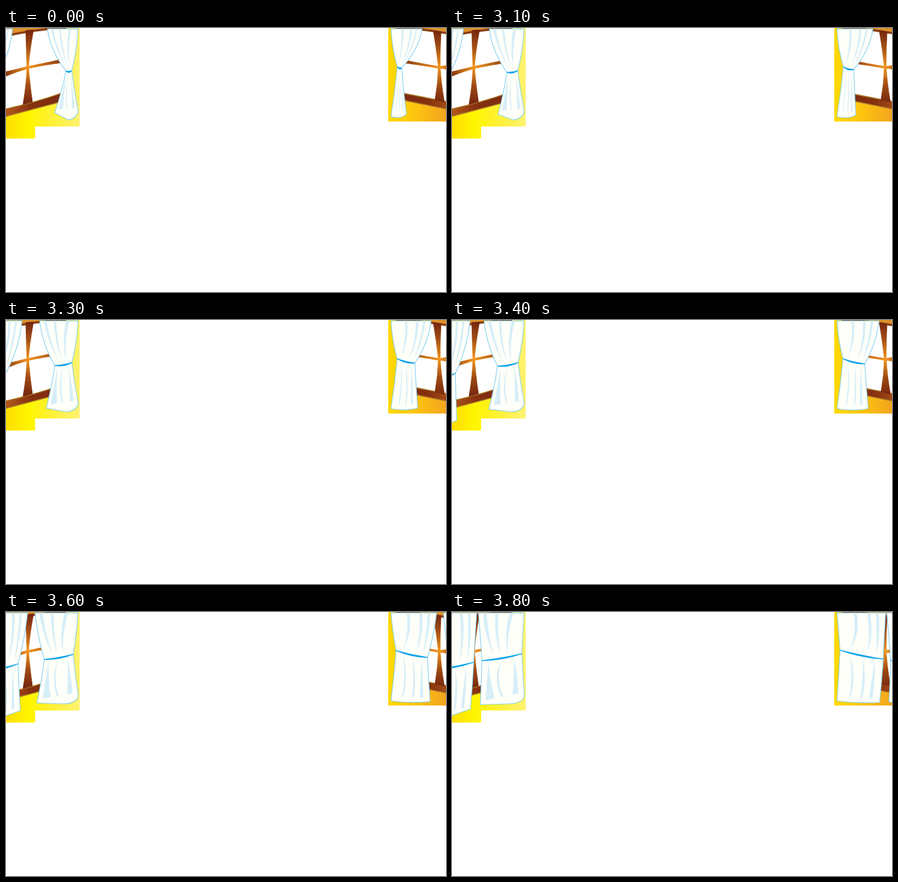
Write an HTML page that moves like this. It is 800 px wide and 480 px high and loops after 4 s.

```html
<!DOCTYPE html>
<html lang="en">
<head>
<meta charset="utf-8">
<title>Curtains closing</title>
<style>
  html, body { margin: 0; width: 100%; height: 100%; overflow: hidden; background: #fff; }
  svg { display: block; width: 800px; height: 480px; }
  .pane { fill: #fff; }
  .rail { stroke: #a9782a; stroke-width: 1.8; }
  .lintel { fill: #dc922c; stroke: #8a4013; stroke-width: 4; }
  .post { fill: url(#post); stroke: url(#post); }
  .cloth { fill: #fffffa; stroke: #80cfef; stroke-width: 1.2; stroke-linejoin: round; }
  .fold { fill: #d6eef8; }
  .tie { fill: #0aa3ec; stroke: #0aa3ec; stroke-width: 1.3; stroke-linejoin: round; }
</style>
</head>
<body>
<svg viewBox="0 0 800 480">
  <defs>
    <linearGradient id="wallL" gradientUnits="userSpaceOnUse" x1="0" x2="134" y1="0" y2="0">
      <stop offset="0" stop-color="#ffdc00"/>
      <stop offset=".32" stop-color="#fff600"/>
      <stop offset=".5" stop-color="#fff120"/>
      <stop offset="1" stop-color="#fff272"/>
    </linearGradient>
    <linearGradient id="wallR" gradientUnits="userSpaceOnUse" x1="695" x2="800" y1="0" y2="0">
      <stop offset="0" stop-color="#ffd900"/>
      <stop offset=".35" stop-color="#fecb0c"/>
      <stop offset="1" stop-color="#f3a51e"/>
    </linearGradient>
    <linearGradient id="post" gradientUnits="userSpaceOnUse" x1="0" x2="0" y1="4" y2="138">
      <stop offset="0" stop-color="#74260f"/>
      <stop offset=".25" stop-color="#a85216"/>
      <stop offset=".5" stop-color="#f3961f"/>
      <stop offset=".75" stop-color="#a04a14"/>
      <stop offset="1" stop-color="#74260f"/>
    </linearGradient>
    <linearGradient id="barL" gradientUnits="userSpaceOnUse" x1="0" x2="100" y1="0" y2="0">
      <stop offset="0" stop-color="#8c3b10"/>
      <stop offset=".4" stop-color="#f3961f"/>
      <stop offset="1" stop-color="#8c3b10"/>
    </linearGradient>
    <linearGradient id="barR" gradientUnits="userSpaceOnUse" x1="726" x2="826" y1="0" y2="0">
      <stop offset="0" stop-color="#8c3b10"/>
      <stop offset=".62" stop-color="#f3961f"/>
      <stop offset="1" stop-color="#8c3b10"/>
    </linearGradient>
    <linearGradient id="railL" gradientUnits="userSpaceOnUse" x1="0" x2="100" y1="0" y2="0">
      <stop offset="0" stop-color="#b4581a"/>
      <stop offset=".45" stop-color="#85300f"/>
      <stop offset="1" stop-color="#7c2a12"/>
    </linearGradient>
    <linearGradient id="railR" gradientUnits="userSpaceOnUse" x1="720" x2="800" y1="0" y2="0">
      <stop offset="0" stop-color="#7c2a12"/>
      <stop offset=".6" stop-color="#85300f"/>
      <stop offset="1" stop-color="#a24a15"/>
    </linearGradient>
    <clipPath id="clipL"><path d="M0 0H134V177Q134 179 132 179H53V199Q53 201 51 201H0Z"/></clipPath>
    <clipPath id="clipR"><path d="M695 0H800V170H695Z"/></clipPath>
  </defs>

  <g clip-path="url(#clipL)">
    <path fill="url(#wallL)" d="M0 0H134V201H0Z"/>
    <path class="pane" d="M0 12Q50 5 108 0V117Q55 133 0 147Z"/>
    <path class="lintel" d="M-4 -9H112L108 -1Q50 3 -4 15Z"/>
    <path class="rail" fill="url(#railL)" d="M-2 147.500Q52 136 108 116V132Q52 147 -2 161Z"/>
    <path fill="url(#barL)" stroke="url(#barL)" d="M0 79.500Q20 75 39 70Q65 65 106 56V62.500Q70 67 41 73.500Q20 79 0 87.500Z"/>
    <path class="post" d="M36 4.500L50 3.500Q42 48 41 71Q43 100 48 134L31 139Q37.500 100 38 71Q37 40 36 4.500Z"/>
  </g>
  <g clip-path="url(#clipR)">
    <path fill="url(#wallR)" d="M695 0H800V170H695Z"/>
    <path class="pane" d="M716 0Q760 3 800 10V134Q760 127 716 117Z"/>
    <path class="lintel" d="M706 -9H804V10Q760 1.500 710 -1Z"/>
    <path class="rail" fill="url(#railR)" d="M716 117.500Q760 126 802 134V147.500Q760 139 716 130Z"/>
    <path fill="url(#barR)" stroke="url(#barR)" d="M716 56.500Q760 66 788 70Q794 69.500 800 68V75Q794 73 788 73.500Q760 68 716 62.500Z"/>
    <path class="post" d="M777 5L791 7Q789 45 789.500 71Q791 100 797 134.500L780 131Q785.500 100 786 71Q783 40 777 5Z"/>
  </g>
  <g id="curtains"></g>
</svg>
<script>
const LOOP = 4000, START = 3000, STEP = 100, LAST = 9, TOP = 1.6;

const mix = (a, b, t) => a + (b - a) * t;
const mixPt = (p, q, t) => [mix(p[0], q[0], t), mix(p[1], q[1], t)];
const pt = p => p[0].toFixed(2) + ' ' + p[1].toFixed(2);

// the top leads, the tie lags, the hem swings, the outer edge gives way late
const lead = p => p + .3 * p * (1 - p);
const lag = p => p - .3 * p * (1 - p);
const swing = p => p * p * (3 - 2 * p);
const late = p => p ** 4;

// fold: position across the panel at its start, middle and end, then its width
const sideFolds = {
  upper: [[.63, .55, .77, .06], [.35, .27, .36, .06], [.17, .12, .16, .05]],
  lower: [[.77, .62, .71, .03], [.47, .38, .44, .04], [.19, .19, .22, .08]]
};
const wideFolds = {
  upper: [[.14, .14, .3, .08], [.4, .36, .46, .06], [.73, .58, .65, .08]],
  lower: [[.16, .17, .22, .2], [.49, .3, .5, .04], [.79, .84, .8, .13]]
};

const straightHem = (i, o) => 'L' + pt(o);
const roundHem = (i, o, p) => `L${mix(113, 104, p)} 167Q${mix(126, 129, p)} 166 ${pt(o)}`;
const bowedHem = (i, o, p) => `C${pt([i[0] - 4 - 10 * p, i[1] + 6 - 5 * p])} 714 165 ${pt(o)}`;

// top, tie and hem belong to the moving edge, given open and closed
const curtains = [
  {
    top: [12, 45], tie: [[-25, 104], [39.5, 91.5]], hem: [[-26, 190], [33.5, 176.5]],
    outTop: -35, outTie: [[-32, 107], [-32, 105]], outHem: [-34, 200],
    hemPath: straightHem, folds: sideFolds
  },
  {
    top: [75.5, 48], tie: [[109, 78], [54.5, 88.5]], hem: [[88.5, 154], [51.5, 168.5]],
    outTop: 131, outTie: [[119.5, 77.5], [127, 76]], outHem: [131.5, 152],
    hemPath: roundHem, folds: wideFolds
  },
  {
    top: [756.5, 788.5], tie: [[719.5, 72.5], [784, 85.5]], hem: [[728, 156], [777.5, 164.5]],
    outTop: 700, outTie: [[711.5, 70.5], [705.5, 69.5]], outHem: [700, 161],
    hemPath: bowedHem, folds: sideFolds
  },
  {
    top: [820, 790.5], tie: [[827, 88], [797.5, 88]], hem: [[860, 160], [794.5, 163.5]],
    outTop: 880, outTie: [[880, 100], [880, 100]], outHem: [880, 175],
    hemPath: straightHem, folds: sideFolds
  }
];

const layer = document.getElementById('curtains');
function addPath(name) {
  const p = document.createElementNS('http://www.w3.org/2000/svg', 'path');
  p.setAttribute('class', name);
  return layer.appendChild(p);
}
for (const c of curtains) c.parts = ['cloth', 'fold', 'tie'].map(addPath);

// quadratic edge [start, control, end]
const edge = (a, b, fx, fy) => [a, [mix(a[0], b[0], fx), mix(a[1], b[1], fy)], b];
const along = ([a, c, b], t) => mixPt(mixPt(a, c, t), mixPt(c, b, t), t);

// a sliver between the two edges of a panel, from w0 wide to w1 wide
function sliver([inner, outer], [a, m, b], w0, w1) {
  const at = (u, v) => pt(mixPt(along(inner, v), along(outer, v), u));
  const from = .06, to = .92, mid = .48, half = .04;
  return `M${at(a - w0 / 2, from * (w0 < .01))}Q${at(m - half, mid)} ${at(b - w1 / 2, to)}` +
    `L${at(b + w1 / 2, to)}Q${at(m + half, mid)} ${at(a + w0 / 2, from * (w0 < .01))}Z`;
}

function pose(c, p) {
  const bend = mix(.15, .6, late(p));
  const top = [mix(...c.top, lead(p)), TOP], outTop = [c.outTop, TOP];
  const tie = [mixPt(...c.tie, lag(p))[0], mixPt(...c.tie, p)[1]];
  const hem = [mixPt(...c.hem, swing(p))[0], mixPt(...c.hem, p)[1]];
  const outTie = mixPt(...c.outTie, late(p));

  const upper = [edge(top, tie, bend, .52), edge(outTop, outTie, bend, .52)];
  const lower = [edge(tie, hem, .35, .5), edge(outTie, c.outHem, .38, .5)];
  const mid = mixPt(tie, outTie, .5);
  const sag = d => pt([mid[0], mid[1] + d]);

  const [cloth, folds, band] = c.parts;
  cloth.setAttribute('d', `M${pt(top)}Q${pt(upper[0][1])} ${pt(tie)}Q${pt(lower[0][1])} ${pt(hem)}` +
    c.hemPath(hem, c.outHem, p) +
    `Q${pt(lower[1][1])} ${pt(outTie)}Q${pt(upper[1][1])} ${pt(outTop)}Z`);
  folds.setAttribute('d',
    c.folds.upper.map(f => sliver(upper, f, f[3], 0)).join('') +
    c.folds.lower.map(f => sliver(lower, f, 0, f[3])).join(''));
  band.setAttribute('d', `M${pt(tie)}Q${sag(2)} ${pt(outTie)}Q${sag(6)} ${pt(tie)}Z`);
}

let shown = -1;
function draw() {
  const t = performance.now() % LOOP;
  const step = Math.min(LAST, Math.max(0, Math.floor((t - START) / STEP) + 1));
  if (step !== shown) {
    shown = step;
    for (const c of curtains) pose(c, step / LAST);
  }
  requestAnimationFrame(draw);
}
draw();
</script>
</body>
</html>
```
